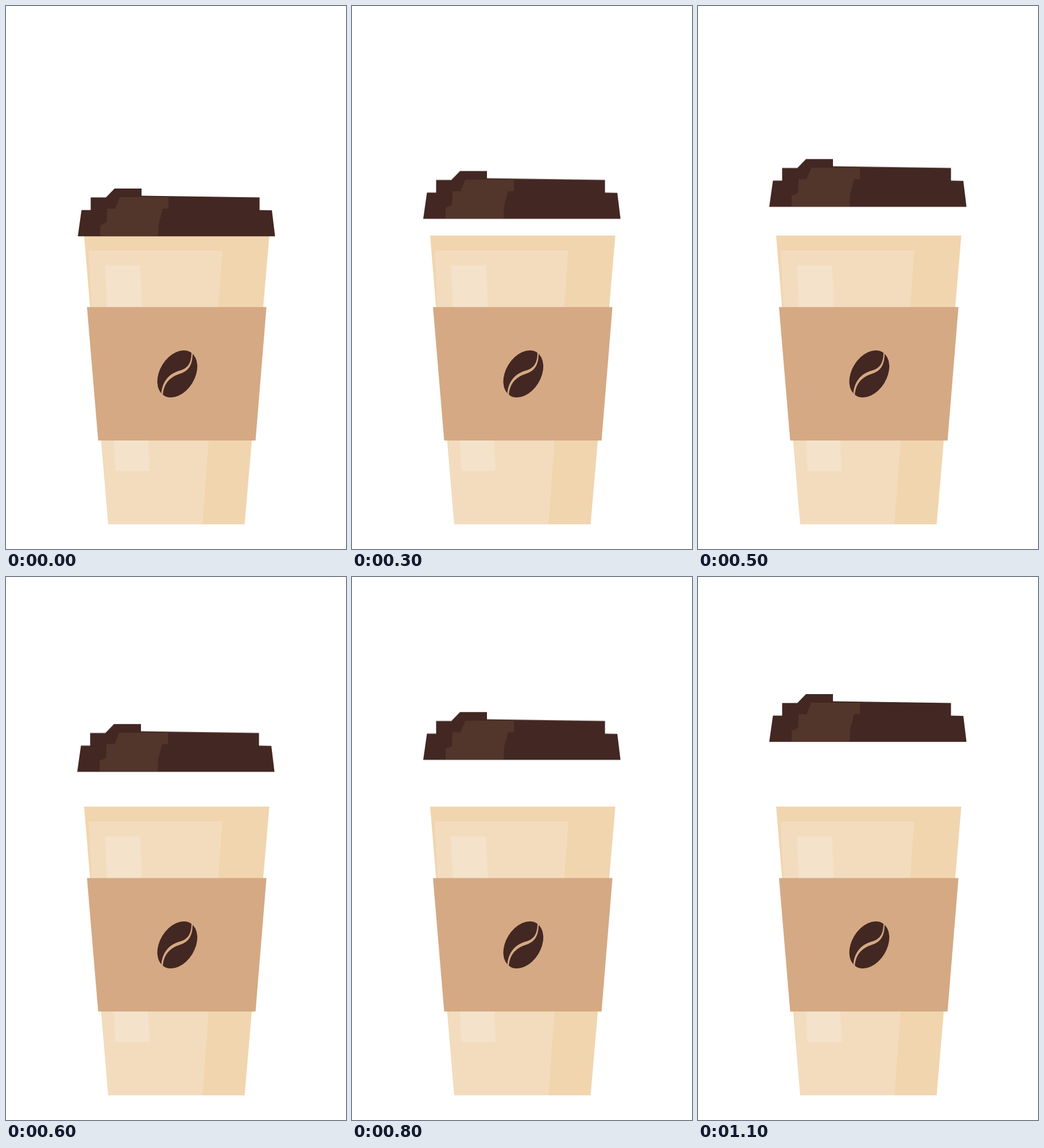
Write an HTML page that moves like this. It is 592x946 px and loops after 1.6 s.

```html
<!DOCTYPE html>
<html lang="en">
<head>
<meta charset="utf-8">
<title>Coffee cup</title>
<style>
  html, body { margin: 0; width: 100%; height: 100%; overflow: hidden; background: #fff; }
  svg { display: block; width: 592px; height: 946px; }
  .cup { fill: #f1d5ae; }
  .shine { fill: #f3dcbe; }
  .glint { fill: #f5e2ca; }
  .sleeve { fill: #d5a983; }
  .dark { fill: #432722; }
  .lid-shine { fill: #52352b; }
  .lid { animation: lift 1600ms infinite; }

  /* The lid rises in 100 ms steps, then rests. */
  @keyframes lift {
    0% { transform: translate(1px, 0); animation-timing-function: steps(1, end); }
    6.25% { transform: translate(0, -9.6px); animation-timing-function: steps(10, end); }
    68.75%, 100% { transform: translate(0, -114px); }
  }
</style>
</head>
<body>
<svg viewBox="0 0 592 946">
  <path class="cup" d="M136 400H458.5L415.5 903H178Z"/>
  <path class="shine" d="M144 426H376.5L342 903H178.5L167.3 757L149 524Z"/>
  <path class="glint" d="M172.3 452H233.3L250 810H190.5Z"/>
  <path class="sleeve" d="M141 524.5H453.5L434.5 757H160.5Z"/>

  <ellipse class="dark" rx="30.5" ry="44.3" transform="translate(298.3 641) rotate(31.5)"/>
  <path class="sleeve" d="M323 602C323 622 317 631 303 635C285 640 272 653 270.5 676L273 679C274 659 284 647 302 641C318 636 325 626 325 604Z"/>

  <g class="lid">
    <path class="dark" d="M188 318H235V330.5L440.5 333.5V355.5L462 356L467.5 401.2H124L130.5 355.5H146.5V333.5H173Z"/>
    <path class="lid-shine" d="M197 333H282V353H272L265 379L264 400.5H163V382L174 377L175 353H189Z"/>
  </g>
</svg>
</body>
</html>
```
